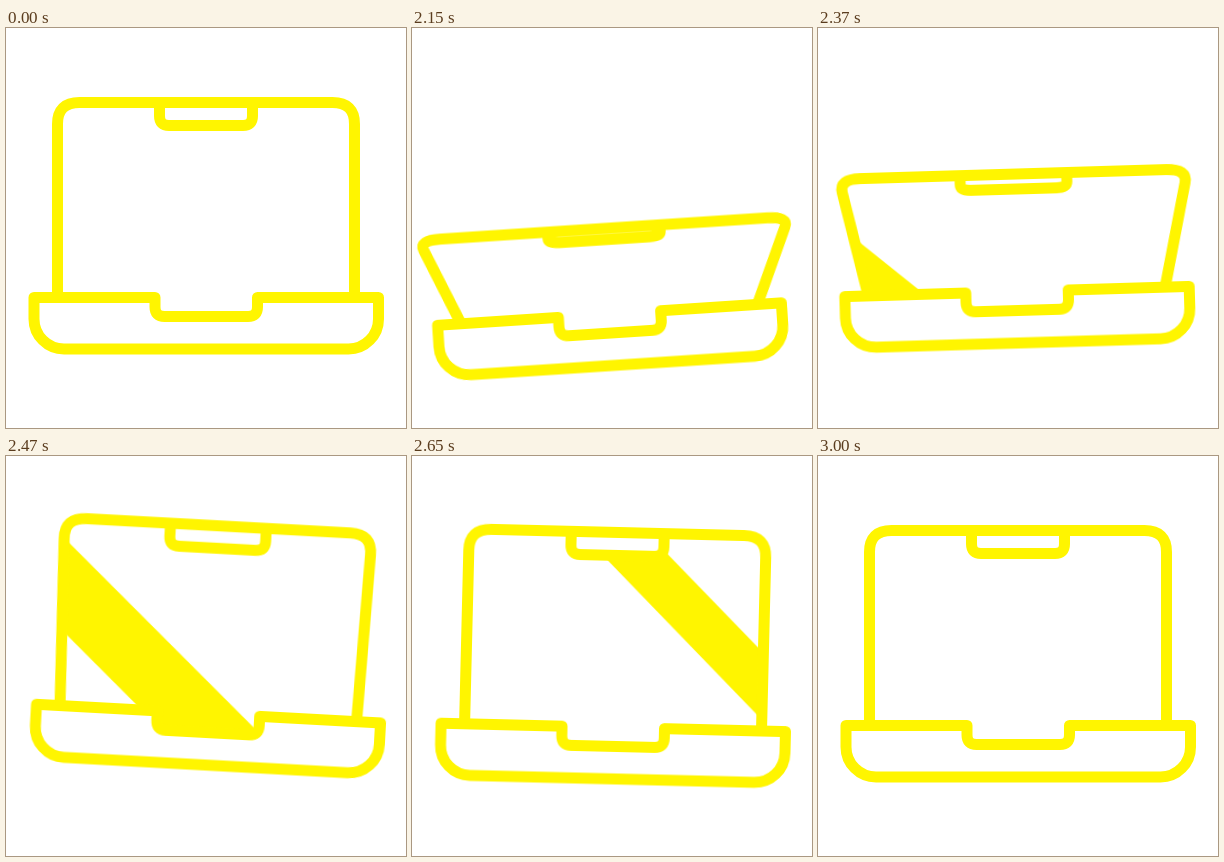
An HTML page without scripts that plays this animation: 400 px wide and 400 px high, repeating every 3.02 s.

```html
<!DOCTYPE html>
<html lang="en">
<head>
<meta charset="utf-8">
<title>Laptop</title>
<style>
  html, body { margin: 0; width: 100%; height: 100%; overflow: hidden; background: #fff; }
  svg { display: block; width: 400px; height: 400px; }

  .laptop, .lid, .shine { animation: 3020ms linear infinite; }
  .laptop { transform-origin: 200px 312px; animation-name: rock; }
  .lid { transform-origin: 200px 269.5px; animation-name: fold, widen; }
  .shine { fill: #fff500; animation-name: sweep; }
  .line { fill: none; stroke: #fff500; stroke-width: 11; stroke-linejoin: round; vector-effect: non-scaling-stroke; }

  /* the whole body dips, tilts and settles */
  @keyframes rock {
    0%, 66.8% { transform: translateY(0) rotate(0deg); }
    66.87% { transform: translateY(1px) rotate(-.1deg); }
    71.19% { transform: translateY(16.5px) rotate(-3.7deg); }
    72.35% { transform: translateY(16.5px) rotate(-4.4deg); }
    73.7% { transform: translateY(11.5px) rotate(-5.2deg); }
    76.16% { transform: translateY(1.4px) rotate(-5.1deg); }
    79.47% { transform: translateY(-9px) rotate(-.3deg); }
    81.79% { transform: translateY(-12px) rotate(3.1deg); }
    83.2% { transform: translateY(-9.5px) rotate(3.2deg); }
    85.43% { transform: translateY(-2px) rotate(2.4deg); }
    87.75% { transform: translateY(1.9px) rotate(1.4deg); }
    92.72% { transform: translateY(1px) rotate(.3deg); }
    99.3%, 100% { transform: translateY(0) rotate(0deg); }
  }

  /* lid height */
  @keyframes fold {
    0%, 66.8% { transform: scaleY(1); }
    66.87% { transform: scaleY(.954); }
    71.19% { transform: scaleY(.443); animation-timing-function: ease-out; }
    73.7% { transform: scaleY(.29); animation-timing-function: ease-in; }
    76.16% { transform: scaleY(.323); animation-timing-function: cubic-bezier(.3, .15, .65, .9); }
    81.79% { transform: scaleY(.964); animation-timing-function: ease-out; }
    84%, 100% { transform: scaleY(1); }
  }

  /* lid top edge grows as it tips forward */
  @keyframes widen {
    0%, 66.4% {
      d: path("M51.5 269.5L51.5 96Q51.5 74.5 73.5 74.5L326.5 74.5Q348.5 74.5 348.5 96L348.5 269.5M153.5 74.5L153.5 88Q153.5 97.5 163 97.5L237 97.5Q246.5 97.5 246.5 88L246.5 74.5");
      animation-timing-function: cubic-bezier(.2, .4, .4, 1);
    }
    73.7% {
      d: path("M51.5 269.5L16.4 98Q11.6 74.5 33 74.5L367 74.5Q388.4 74.5 383.6 98L348.5 269.5M143 74.5L143 90Q143 100 154 100L246 100Q257 100 257 90L257 74.5");
      animation-timing-function: cubic-bezier(.5, 0, .6, 1);
    }
    84.4%, 100% {
      d: path("M51.5 269.5L51.5 96Q51.5 74.5 73.5 74.5L326.5 74.5Q348.5 74.5 348.5 96L348.5 269.5M153.5 74.5L153.5 88Q153.5 97.5 163 97.5L237 97.5Q246.5 97.5 246.5 88L246.5 74.5");
    }
  }

  /* diagonal glint, lower left to upper right */
  @keyframes sweep {
    0%, 76.8% { d: path("M0 239L400 569L400 679L0 349Z"); }
    81.79% { d: path("M0 61L400 420L400 510L0 151Z"); }
    87.75% { d: path("M0 -150L400 243L400 310L0 -84Z"); }
    94%, 100% { d: path("M0 -379L400 53L400 94L0 -338Z"); }
  }
</style>
</head>
<body>
<svg viewBox="0 0 400 400" width="400" height="400">
  <defs>
    <clipPath id="screen">
      <path class="lid" clip-rule="evenodd"/>
      <path d="M149 269H251V289H149Z"/>
    </clipPath>
  </defs>
  <g class="laptop">
    <g clip-path="url(#screen)"><path class="shine"/></g>
    <path class="lid line"/>
    <path class="line" d="M28 269.5H149V279Q149 288.5 158.5 288.5H242Q251.5 288.5 251.5 279V269.5H372.5V291A30 30 0 0 1 342.5 321H58A30 30 0 0 1 28 291Z"/>
  </g>
</svg>
</body>
</html>
```
